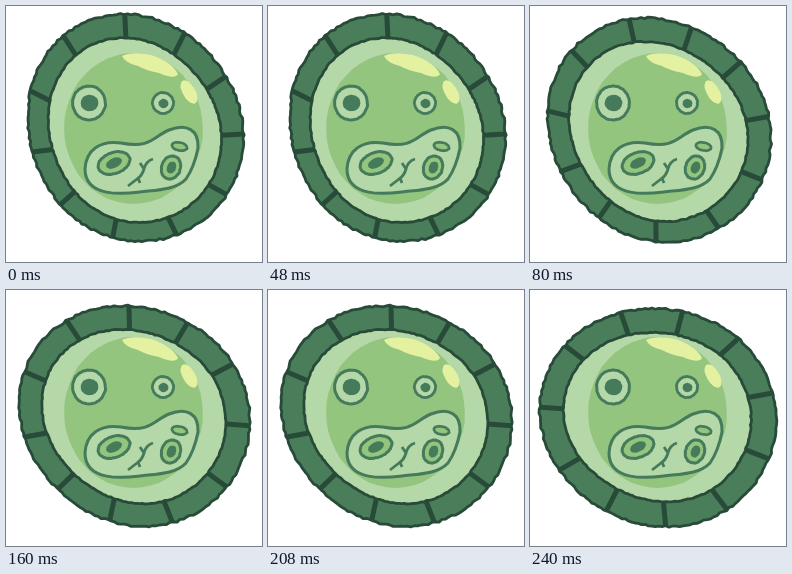
An HTML page with a canvas for the animation above (320 ms loop, 256 by 256 pixels).

```html
<!DOCTYPE html>
<html lang="en">
<head>
<meta charset="utf-8">
<title>Wobbling cell</title>
<style>
  html, body { margin: 0; width: 100%; height: 100%; overflow: hidden; background: #fff; }
  canvas { display: block; width: 100vw; height: 100vh; }
</style>
</head>
<body>
<canvas id="stage" width="256" height="256"></canvas>
<script>
const ctx = document.getElementById('stage').getContext('2d');
const STEP = 80, POSES = 4, JOINTS = 11, TAU = Math.PI * 2;
const WALL = '#4a7d59', EDGE = '#284a39', PALE = '#b5d8a8',
      MID = '#93c57f', LINE = '#457b5a', SHINE = '#e3f1a1';

// Direction of the first wall joint in each pose, in degrees
const firstJoint = [265, 255, 267, 250];

const rad = deg => deg * TAU / 360;

function noise(n) {
  const s = Math.sin(n * 127.1 + 31.7) * 43758.5453;
  return s - Math.floor(s) - 0.5;
}

function paint(path, fill, stroke, width) {
  if (fill) { ctx.fillStyle = fill; ctx.fill(path); }
  if (stroke) { ctx.strokeStyle = stroke; ctx.lineWidth = width; ctx.stroke(path); }
}

// Egg outline: a circle stretched along an axis, with one end fuller
function eggPoint(egg, a) {
  const d = a - egg.axis;
  const r = egg.r + 5.5 * Math.cos(2 * d) + Math.cos(3 * d);
  return [egg.x + r * Math.cos(a), egg.y + r * Math.sin(a)];
}

function eggPath(egg, rough, seed) {
  const path = new Path2D();
  for (let deg = 0; deg < 360; deg += 1.8) {
    const jitter = noise(deg + seed) * rough;
    path.lineTo(...eggPoint({ ...egg, r: egg.r + jitter }, rad(deg)));
  }
  path.closePath();
  return path;
}

function oval(x, y, rx, ry, tilt = 0, seed = 0) {
  const path = new Path2D(), c = Math.cos(tilt), s = Math.sin(tilt);
  for (let k = 0; k < 48; k++) {
    const a = k * TAU / 48, j = noise(k + seed) * 0.6;
    const u = (rx + j) * Math.cos(a), v = (ry + j) * Math.sin(a);
    path.lineTo(x + u * c - v * s, y + u * s + v * c);
  }
  path.closePath();
  return path;
}

function drawWall(i) {
  const axis = rad(241 - 15 * i), seed = i * 400;
  const outer = { x: 128.7, y: 122 + 1.6 * i, r: 110.3 + i, axis };
  const inner = { x: 128, y: 124.5 + 0.6 * i, r: 89, axis };

  paint(eggPath(outer, 1.8, seed), WALL, EDGE, 2.8);
  const joints = new Path2D();
  for (let k = 0; k < JOINTS; k++) {
    const a = rad(firstJoint[i] + k * 360 / JOINTS);
    joints.moveTo(...eggPoint(inner, a));
    joints.lineTo(...eggPoint(outer, a));
  }
  paint(joints, null, EDGE, 5);
  paint(eggPath(inner, 1, seed + 70), PALE, EDGE, 2.8);
}

function drawBody() {
  paint(oval(127.5, 122.5, 69.5, 75.5), MID);
  paint(new Path2D('M116 50Q126 45 145 49Q166 56 172 68Q169 74 153 67' +
                   'Q141 65 132 60Q119 57 116 50Z'), SHINE);
  paint(oval(183, 86, 13, 6.3, 1.05), SHINE);
}

function drawFace(seed) {
  paint(oval(83, 97, 16.5, 17, 0, seed), PALE, LINE, 3);
  paint(oval(83.5, 97, 8.8, 8.3, 0, seed + 9), LINE);
  paint(oval(157, 97, 10.5, 10.5, 0, seed + 5), PALE, LINE, 2.8);
  paint(oval(157.5, 97.5, 5, 4.6, 0, seed + 3), LINE);

  paint(new Path2D('M79 163C80 144 94 134 115 137C145 143 148 130 163 124' +
                   'C181 117 193 124 192 142C190 152 187 163 180 173' +
                   'C170 184 150 184 134 186C118 188 79 192 79 163Z'), PALE, LINE, 3);
  paint(oval(108, 157, 16.5, 10.5, -0.35, seed), MID, LINE, 3);
  paint(oval(108, 157, 8.5, 4.8, -0.45, seed), LINE);
  paint(oval(165, 161.5, 9.5, 11.8, 0.35, seed), MID, LINE, 3);
  paint(oval(165.5, 161.5, 4.6, 6.2, 0.4, seed), LINE);
  paint(oval(173.5, 140.5, 7.8, 4, 0.2, seed), MID, LINE, 2.6);

  paint(new Path2D('M147 153Q140 155 138 163Q136 170 131 173L122 180' +
                   'M134 157L138 163M132 172L134 177'), null, LINE, 2.8);
}

function draw(ms) {
  const i = Math.floor(ms / STEP) % POSES;
  ctx.clearRect(0, 0, 256, 256);
  drawWall(i);
  drawBody();
  drawFace(i % 2 * 60);
}

ctx.lineJoin = 'round';
const start = performance.now();
function tick() {
  draw(performance.now() - start);
  requestAnimationFrame(tick);
}
tick();
</script>
</body>
</html>
```
